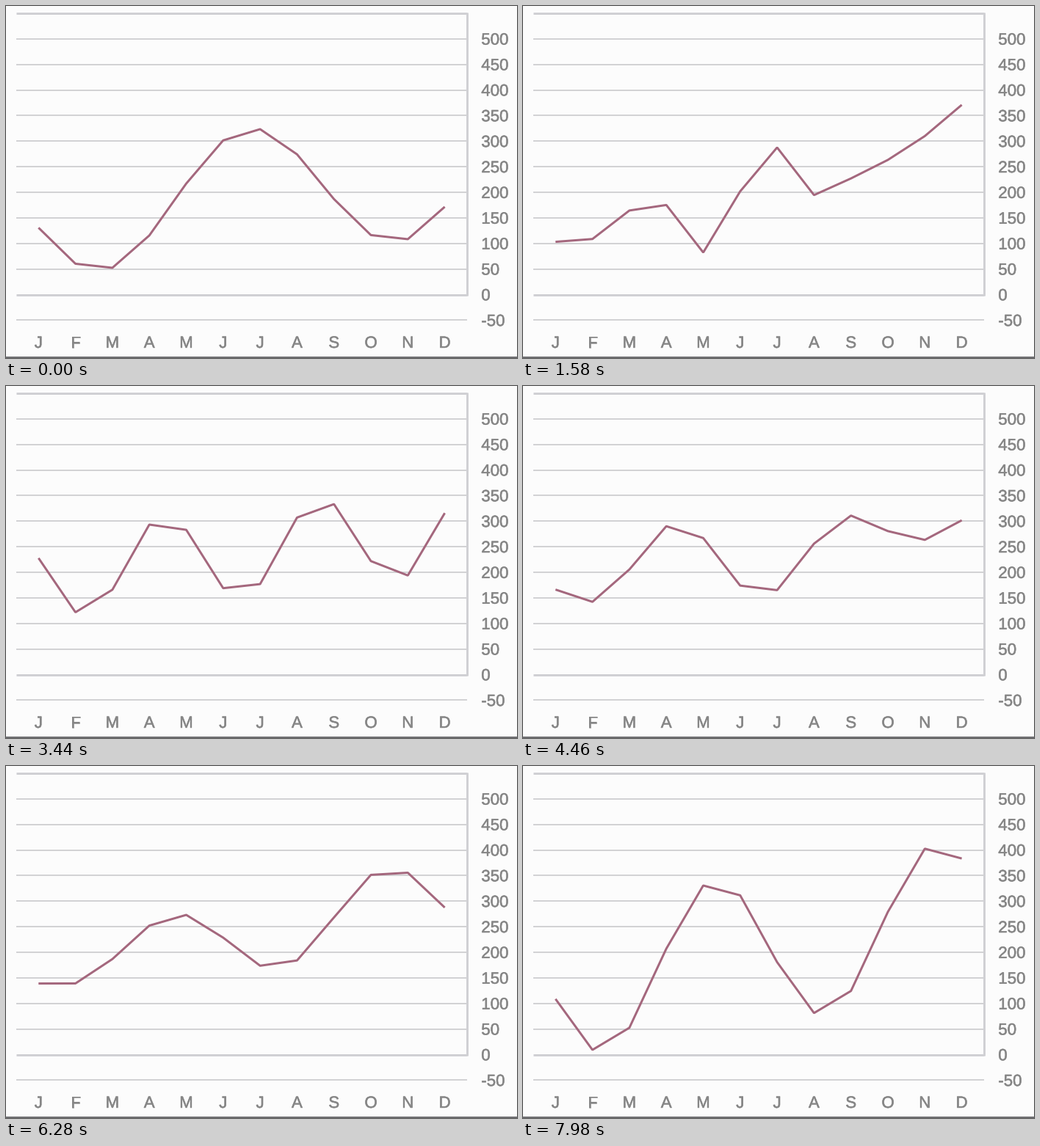
A matplotlib script for the animation above (8000 ms loop, 696 by 480 pixels).

```python
import numpy as np
import matplotlib.pyplot as plt
from matplotlib import patheffects
from matplotlib.animation import FuncAnimation

W, H, DPI = 696, 480, 100
STEP, LOOP = 20, 8000
PAPER, GRID, AXIS = "#fcfcfc", "#d2d2d4", "#d0d0d4"
INK, CURVE, EDGE = "#868686", "#a4677d", "#727274"
LEFT, RIGHT, ZERO, SCALE = 14, 628, 393.6, 0.6975

MONTHS = np.arange(12)
MONTH_X = 44.3 + 50.3 * MONTHS


def season(base, rise, swing, peak, period):
    """A steady yearly rise with one wave on top of it."""
    wave = np.cos(2 * np.pi * (MONTHS - peak) / period)
    return np.clip(base + rise * MONTHS + swing * wave, 5, 550)


# Each pose of the curve and the time (ms) at which it is reached
POSES = {
    0: season(160, 7, 125, 5.7, 8),
    1020: season(50, 28, 100, 10.2, 4.2),
    2180: season(130, 12, 85, 0.1, 2.75),
    3440: season(195, 8, 90, 3.4, 4.2),
    5600: season(170, 11, 85, 2.8, 6.5),
    6980: season(165, 13, 85, 4.2, 5.3),
    7980: season(140, 12, 150, 4.3, 6),
}
TIMES = list(POSES)


def px(width):
    return width * 72 / DPI


def y_of(value):
    return ZERO - SCALE * value


def values_at(t):
    i = min(np.searchsorted(TIMES, t, side="right"), len(TIMES) - 1)
    start, end = TIMES[i - 1], TIMES[i]
    ease = (1 - np.cos(np.pi * (t - start) / (end - start))) / 2
    return POSES[start] + (POSES[end] - POSES[start]) * ease


plt.rcParams["font.family"] = "Liberation Sans"
fig = plt.figure(figsize=(W / DPI, H / DPI), dpi=DPI, facecolor=PAPER)
ax = fig.add_axes([0, 0, 1, 1])
ax.set_xlim(0, W)
ax.set_ylim(H, 0)
ax.axis("off")


def rule(xs, ys, color, width):
    ax.plot(xs, ys, color=color, lw=px(width), solid_capstyle="butt", zorder=1)


def label(x, y, text, align):
    bolder = patheffects.withStroke(linewidth=px(0.5), foreground=INK)
    ax.text(x, y, text, color=INK, fontsize=px(22.3), ha=align,
            va="baseline", path_effects=[bolder])


for value in range(-50, 551, 50):
    y = y_of(value)
    strong = value in (0, 550)
    rule([LEFT, RIGHT], [y, y], AXIS if strong else GRID, 3 if strong else 2)
    if value < 550:
        label(647.3, y + 7.8, str(value), "left")
rule([RIGHT, RIGHT], [y_of(550) - 1, y_of(0) + 1], AXIS, 3)
rule([0, W], [479, 479], EDGE, 2)

for x, month in zip(MONTH_X, "JFMAMJJASOND"):
    label(x, 466, month, "center")

curve, = ax.plot(MONTH_X, y_of(POSES[0]), color=CURVE, lw=px(3), zorder=3,
                 solid_capstyle="butt", solid_joinstyle="bevel")


def draw(frame):
    curve.set_ydata(y_of(values_at(frame * STEP)))
    return curve,


anim = FuncAnimation(fig, draw, frames=LOOP // STEP, interval=STEP,
                     repeat=True, repeat_delay=0, blit=True)
plt.show()
```
